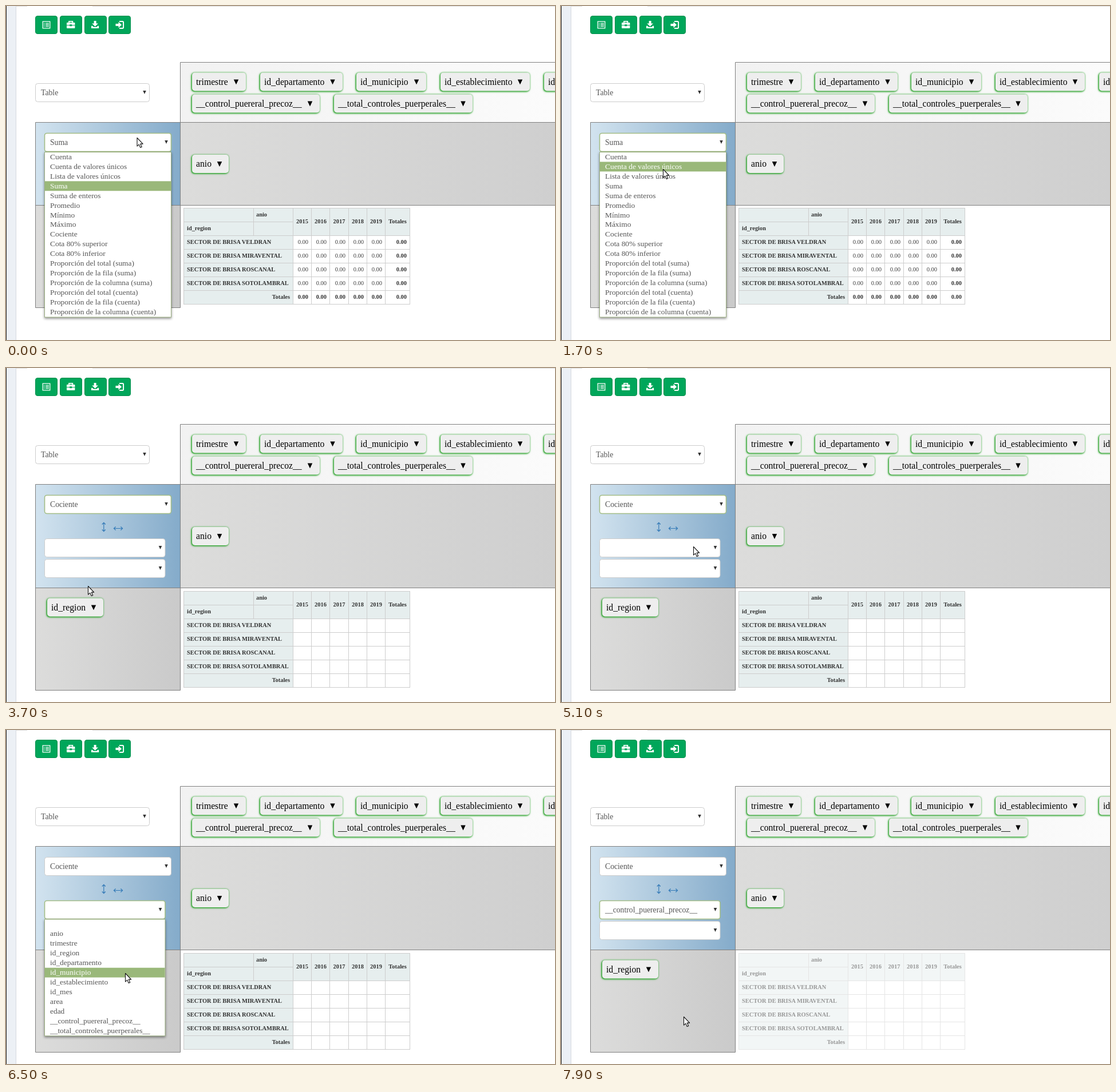
Write an HTML page that moves like this. It is 959 px wide and 584 px high and loops after 8 s.

```html
<!DOCTYPE html>
<html lang="es">
<head>
<meta charset="utf-8">
<title>Tabla dinámica</title>
<style>
html, body { margin: 0; width: 100%; height: 100%; overflow: hidden; background: #fff; }
svg { display: block; }
text { font-family: "Liberation Serif", "Times New Roman", serif; white-space: pre; }
.chip { fill: #eee; filter: drop-shadow(-1px 1px 1px #28a028) drop-shadow(0 0 1.6px #44b044); }
.chip-text { font-size: 15.7px; fill: #000; }
.field { fill: #fff; stroke: #ccc; }
.field.focus { stroke: #a3bd86; stroke-width: 1.6; }
.field-text { font-size: 13.7px; fill: #555; }
.list { fill: #fff; stroke: #9bb080; filter: drop-shadow(0 2px 2px rgba(0,0,0,.45)); }
.item { font-size: 13.4px; fill: #555; }
.item.on { fill: #fff; }
.mark { fill: #9ab87a; }
.cell { fill: #fff; stroke: #cdcdcd; }
.cell.head { fill: #e6eeee; }
.cell-text { font-size: 10.5px; fill: #3d3d3d; }
.bold { font-size: 10.4px; font-weight: bold; fill: #333; }
.frame { fill: none; stroke: #808080; }
</style>
</head>
<body>
<svg id="stage" width="959" height="584" viewBox="0 0 959 584">
  <defs>
    <linearGradient id="blue"><stop offset="0" stop-color="#d2e3ef"/><stop offset="1" stop-color="#84abca"/></linearGradient>
    <linearGradient id="grey"><stop offset="0" stop-color="#dcdcdb"/><stop offset="1" stop-color="#cfcfcf"/></linearGradient>
    <linearGradient id="side"><stop offset="0" stop-color="#dcdcdb"/><stop offset="1" stop-color="#cacaca"/></linearGradient>
    <linearGradient id="pale"><stop offset="0" stop-color="#f2f2f2"/><stop offset="1" stop-color="#fbfbfb"/></linearGradient>
  </defs>
</svg>
<script>
const LOOP = 8000, STEP = 200, PITCH = 16.94, SHIFT = 36, TABLE_SHIFT = 37;
const stage = document.getElementById('stage');

function add(parent, tag, attrs, content) {
  const el = document.createElementNS('http://www.w3.org/2000/svg', tag);
  for (const k in attrs) el.setAttribute(k, attrs[k]);
  if (content !== undefined) el.textContent = content;
  parent.appendChild(el);
  return el;
}
const group = parent => add(parent, 'g', {});
const rect = (p, x, y, r, b, attrs) => add(p, 'rect', { x, y, width: r - x, height: b - y, ...attrs });
const path = (p, d, attrs) => add(p, 'path', { d, ...attrs });
const label = (p, x, y, cls, s, anchor = 'start') =>
  add(p, 'text', { x, y: Math.round(y), class: cls, 'text-anchor': anchor }, s);
const caret = (p, x, y, w, h, fill) =>
  path(p, `M${x - w / 2} ${y - h / 2}h${w}l${-w / 2} ${h}z`, { fill });

function chip(p, x, r, cy, tri, s) {
  rect(p, x, cy - 16, r, cy + 16, { rx: 5, class: 'chip' });
  label(p, x + 7, cy + 5.2, 'chip-text', s);
  if (tri) caret(p, tri, cy + .5, 8.4, 8.8, '#000');
}

function field(p, x, y, r, s = '') {
  const box = rect(p, x + .5, y + .5, r - .5, y + 32.5, { rx: 4, class: 'field' });
  const text = label(p, x + 10, y + 20.6, 'field-text', s);
  caret(p, r - 9, y + 16, 5.6, 6, '#333');
  return { box, text };
}

function dropdown(x, top, r, items) {
  const g = group(stage);
  rect(g, x + .5, top, r - .5, top + items.length * PITCH + .6, { class: 'list' });
  const mark = rect(g, x + 1, top, r - 1, top + PITCH, { class: 'mark' });
  const rows = items.map((s, i) => label(g, x + 10, top + i * PITCH + 12.4, 'item', s));
  return {
    g,
    hover(y, fallback) {
      const n = y < top ? fallback : Math.min(items.length - 1, Math.floor((y - top) / PITCH));
      mark.setAttribute('y', top + n * PITCH);
      rows.forEach((el, i) => el.classList.toggle('on', i === n));
    }
  };
}

// Page chrome and toolbar
rect(stage, 0, 0, 18, 584, { fill: '#ecf0f5' });
rect(stage, 0, 0, 1, 584, { fill: '#222' });
path(stage, 'M17.5 0V584', { stroke: '#d5d9e0' });
path(stage, 'M18 .5H37M151 .5H959', { stroke: '#ddd' });
for (const x of [51, 94, 137, 179])
  rect(stage, x + .5, 17.5, x + 38.5, 48.5, { rx: 3.5, fill: '#00a65a', stroke: '#008d4c' });
const line = { fill: 'none', stroke: '#fff' };
const solid = { fill: '#fff' };
path(stage, 'M64.2 27.2h12.6v11.6h-12.6z', { ...line, 'stroke-width': 1.3 });
path(stage, 'M66 30.3h1.5M69 30.3h6M66 33h1.5M69 33h6M66 35.7h1.5M69 35.7h6', { ...line, 'stroke-width': 1.3 });
path(stage, 'M110 29v-2.2h6.4v2.2', { ...line, 'stroke-width': 1.7 });
path(stage, 'M107 29h12.4q1 0 1 1v3.2h-5.2v-1h-4v1h-5.2v-3.2q0-1 1-1zM106 34.3h5.2v1h4v-1h5.2v3.7q0 1-1 1h-12.4q-1 0-1-1z', solid);
path(stage, 'M153.6 26h4v4.5h3.4l-5.4 5.2-5.4-5.2h3.4zM149 34.8h2l2 2h5.2l2-2h2v4.2h-13.2z', solid);
path(stage, 'M191.5 31h5v-3.2l5.6 5.2-5.6 5.2v-3.2h-5z', solid);
path(stage, 'M198 27.1h5.5q1.6 0 1.6 1.6v8.6q0 1.6-1.6 1.6h-5.5', { ...line, 'stroke-width': 2 });

// Unused attributes
rect(stage, 305, 99, 959, 204, { fill: 'url(#pale)' });
const CHIPS = [
  [325, 419, 132.4, 402, 'trimestre'],
  [444, 588, 132.4, 570.5, 'id_departamento'],
  [612, 734, 132.4, 717, 'id_municipio'],
  [759, 915, 132.4, 898, 'id_establecimiento'],
  [940, 1010, 132.4, 0, 'id_mes'],
  [325, 548, 170.5, 531, '__control_puereral_precoz__'],
  [573, 815, 170.5, 798.5, '__total_controles_puerperales__']
];
CHIPS.forEach(c => chip(stage, ...c));
field(stage, 51, 135, 251, 'Table');

// Two heights of the pivot area
function pivotArea(dy) {
  const g = group(stage), mid = 348.5 + dy, end = 527.5 + dy;
  rect(g, 52, 204, 305, mid, { fill: 'url(#blue)' });
  rect(g, 305, 204, 959, mid, { fill: 'url(#grey)' });
  rect(g, 52, mid, 305, end, { fill: 'url(#side)' });
  path(g, `M960 98.5H304.5V${end}M960 203.5H51.5V${end}H304.5M51.5 ${mid}H960`, { class: 'frame' });
  chip(g, 325, 389, 276 + dy / 2, 373, 'anio');
  chip(g, 72, 170, 382.4 + dy, 153, 'id_region');
  return g;
}
const low = pivotArea(0), tall = pivotArea(SHIFT);

path(tall, 'M170.8 270.5V285.5M167.8 273.5l3-3.2 3 3.2M167.8 282.5l3 3.2 3-3.2M188.5 280.5H203.5M191.6 277.5l-3.2 3 3.2 3M200.4 277.5l3.2 3-3.2 3',
  { fill: 'none', stroke: '#337ab7', 'stroke-width': 1.2 });
const ratioTop = field(tall, 67, 298, 278.5);
field(tall, 67, 334, 278.5);
const aggregate = field(stage, 67, 222, 289, 'Suma');

// Result table
const table = group(stage), counts = group(table);
const X = [501.5, 533.5, 565.5, 598.5, 630.5, 662.5, 705.5];
const rowY = i => 353.5 + 24 * i;
const cell = (x, y, r, b, head) => rect(table, x, y, r, b, { class: head ? 'cell head' : 'cell' });
const HEADS = ['2015', '2016', '2017', '2018', '2019', 'Totales'];
const ROWS = ['SECTOR DE BRISA VELDRAN', 'SECTOR DE BRISA MIRAVENTAL', 'SECTOR DE BRISA ROSCANAL', 'SECTOR DE BRISA SOTOLAMBRAL', 'Totales'];
for (const i of [0, 1]) {
  cell(310.5, rowY(i), 432.5, rowY(i + 1), true);
  cell(432.5, rowY(i), 501.5, rowY(i + 1), true);
}
label(table, 437, 368.4, 'cell-text bold', 'anio');
label(table, 316, 392.4, 'cell-text bold', 'id_region');
HEADS.forEach((s, i) => {
  cell(X[i], rowY(0), X[i + 1], rowY(2), true);
  label(table, (X[i] + X[i + 1]) / 2, 380, 'cell-text bold', s, 'middle');
});
ROWS.forEach((s, n) => {
  const y = rowY(n + 2), last = n === ROWS.length - 1;
  cell(310.5, y, 501.5, y + 24, true);
  label(table, last ? 496 : 316, y + 14.9, 'cell-text bold', s, last ? 'end' : 'start');
  HEADS.forEach((h, i) => {
    cell(X[i], y, X[i + 1], y + 24);
    label(counts, X[i + 1] - 5.5, y + 14.9, 'cell-text' + (last || i === 5 ? ' bold' : ''), '0.00', 'end');
  });
});
table.appendChild(counts);

const modes = dropdown(67, 255.5, 289, [
  'Cuenta', 'Cuenta de valores únicos', 'Lista de valores únicos', 'Suma', 'Suma de enteros',
  'Promedio', 'Mínimo', 'Máximo', 'Cociente', 'Cota 80% superior', 'Cota 80% inferior',
  'Proporción del total (suma)', 'Proporción de la fila (suma)', 'Proporción de la columna (suma)',
  'Proporción del total (cuenta)', 'Proporción de la fila (cuenta)', 'Proporción de la columna (cuenta)'
]);
const columns = dropdown(67, 331, 278.5, [
  '', 'anio', 'trimestre', 'id_region', 'id_departamento', 'id_municipio', 'id_establecimiento',
  'id_mes', 'area', 'edad', '__control_puereral_precoz__', '__total_controles_puerperales__'
]);

const pointer = path(stage, 'M0 0V14.6L3.3 11.6 5.7 17 8.2 15.9 5.8 10.6H10.2Z',
  { fill: '#fff', stroke: '#111', 'stroke-width': 1.1, 'stroke-linejoin': 'round' });

// Pointer path: time, x, y
const MOVES = [
  [300, 229, 230.5], [500, 229, 226], [1100, 222, 228], [1500, 200, 250], [1700, 178.5, 285.5],
  [2700, 131.5, 398], [3500, 131.5, 398], [3700, 143.5, 381.5], [4700, 185, 323], [5100, 231.5, 312.5],
  [6100, 231.5, 312.5], [6300, 222, 362], [6500, 208.5, 425.5], [6900, 212, 521], [7300, 214.5, 501.5]
];

function pointerAt(t) {
  const i = MOVES.findIndex(m => m[0] > t);
  if (i === 0) return MOVES[0].slice(1);
  if (i < 0) return MOVES[MOVES.length - 1].slice(1);
  const a = MOVES[i - 1], b = MOVES[i], k = (t - a[0]) / (b[0] - a[0]);
  return [a[1] + (b[1] - a[1]) * k, a[2] + (b[2] - a[2]) * k];
}

const show = (el, on) => el.setAttribute('display', on ? 'inline' : 'none');

function draw(now) {
  const t = now % LOOP;
  const q = Math.floor((t - 100) / STEP) * STEP + 100;
  const [x, y] = pointerAt(q);
  const ratio = t >= 3700, picking = t >= 5500, done = t >= 7900;

  show(low, !ratio);
  show(tall, ratio);
  show(counts, !ratio);
  show(modes.g, !ratio);
  show(columns.g, picking && !done);
  modes.hover(y, 3);
  columns.hover(y, 0);

  aggregate.text.textContent = ratio ? 'Cociente' : 'Suma';
  aggregate.box.classList.toggle('focus', !picking);
  ratioTop.box.classList.toggle('focus', picking);
  ratioTop.text.textContent = done ? '__control_puereral_precoz__' : '';
  table.setAttribute('transform', `translate(0 ${ratio ? TABLE_SHIFT : 0})`);
  table.setAttribute('opacity', done ? .5 : 1);
  pointer.setAttribute('transform', `translate(${x} ${y})`);
}

function tick() {
  draw(performance.now());
  requestAnimationFrame(tick);
}
tick();
</script>
</body>
</html>
```
